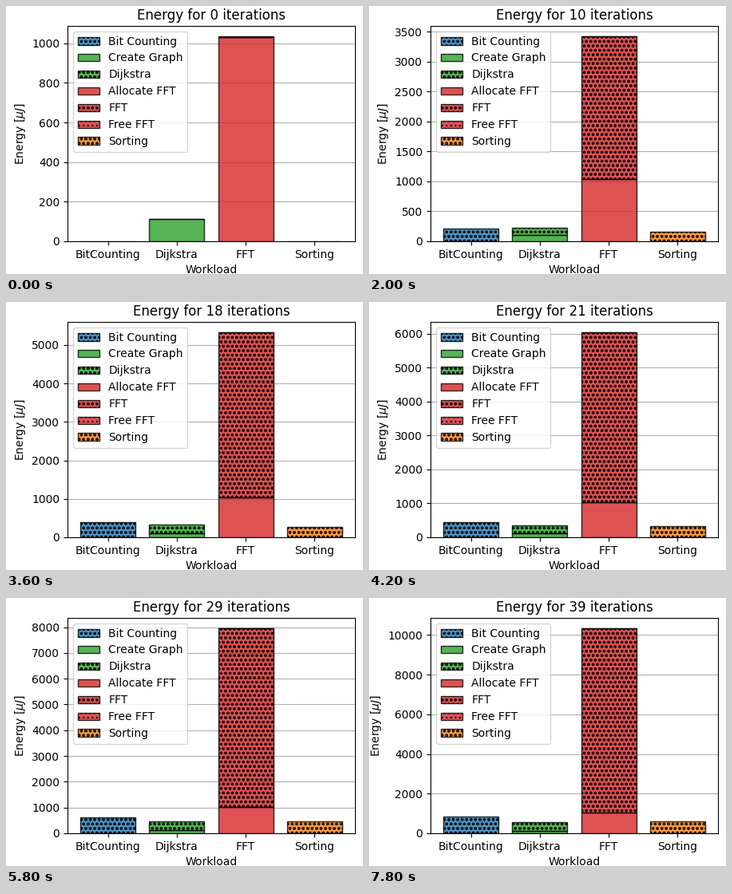
A matplotlib script that plays this animation: 447x336 px, repeating every 8000 ms.

```python
import matplotlib.pyplot as plt
from matplotlib.animation import FuncAnimation

W, H, DPI = 447, 336, 100
FRAMES, STEP_MS = 40, 200

WORKLOADS = ["BitCounting", "Dijkstra", "FFT", "Sorting"]

# label, workload index, fixed energy, energy per iteration, colour, hatch
PARTS = [
    ("Bit Counting", 0, 0, 21.7, "tab:blue", "ooo"),
    ("Create Graph", 1, 113, 0, "tab:green", None),
    ("Dijkstra", 1, 0, 11.6, "tab:green", "ooo"),
    ("Allocate FFT", 2, 1032, 0, "tab:red", None),
    ("FFT", 2, 0, 238.75, "tab:red", "ooo"),
    ("Free FFT", 2, 4, 0, "tab:red", "..."),
    ("Sorting", 3, 0, 15.5, "tab:orange", "ooo"),
]

plt.rcParams["font.family"] = "DejaVu Sans"
fig = plt.figure(figsize=(W / DPI, H / DPI), dpi=DPI)
ax = fig.add_axes([77 / W, 41 / H, 360 / W, 270 / H])


def draw(n):
    ax.clear()
    tops = [0.0] * len(WORKLOADS)
    for label, i, fixed, rate, color, hatch in PARTS:
        energy = fixed + rate * n
        ax.bar(i, energy, bottom=tops[i], label=label, color=color,
               edgecolor="black", linewidth=1, alpha=0.8, hatch=hatch)
        tops[i] += energy
    ax.set_xlim(-0.59, 3.59)
    ax.set_ylim(0, 1.05 * max(tops))
    ax.set_xticks(range(len(WORKLOADS)), WORKLOADS)
    ax.set_axisbelow(True)
    ax.grid(axis="y")
    ax.set_title(f"Energy for {n} iterations")
    ax.set_xlabel("Workload")
    ax.set_ylabel(r"Energy [$\mu J$]")
    ax.legend(loc="upper left")


anim = FuncAnimation(fig, draw, frames=FRAMES, init_func=lambda: draw(0),
                     interval=STEP_MS, repeat=True, repeat_delay=0)
plt.show()
```
